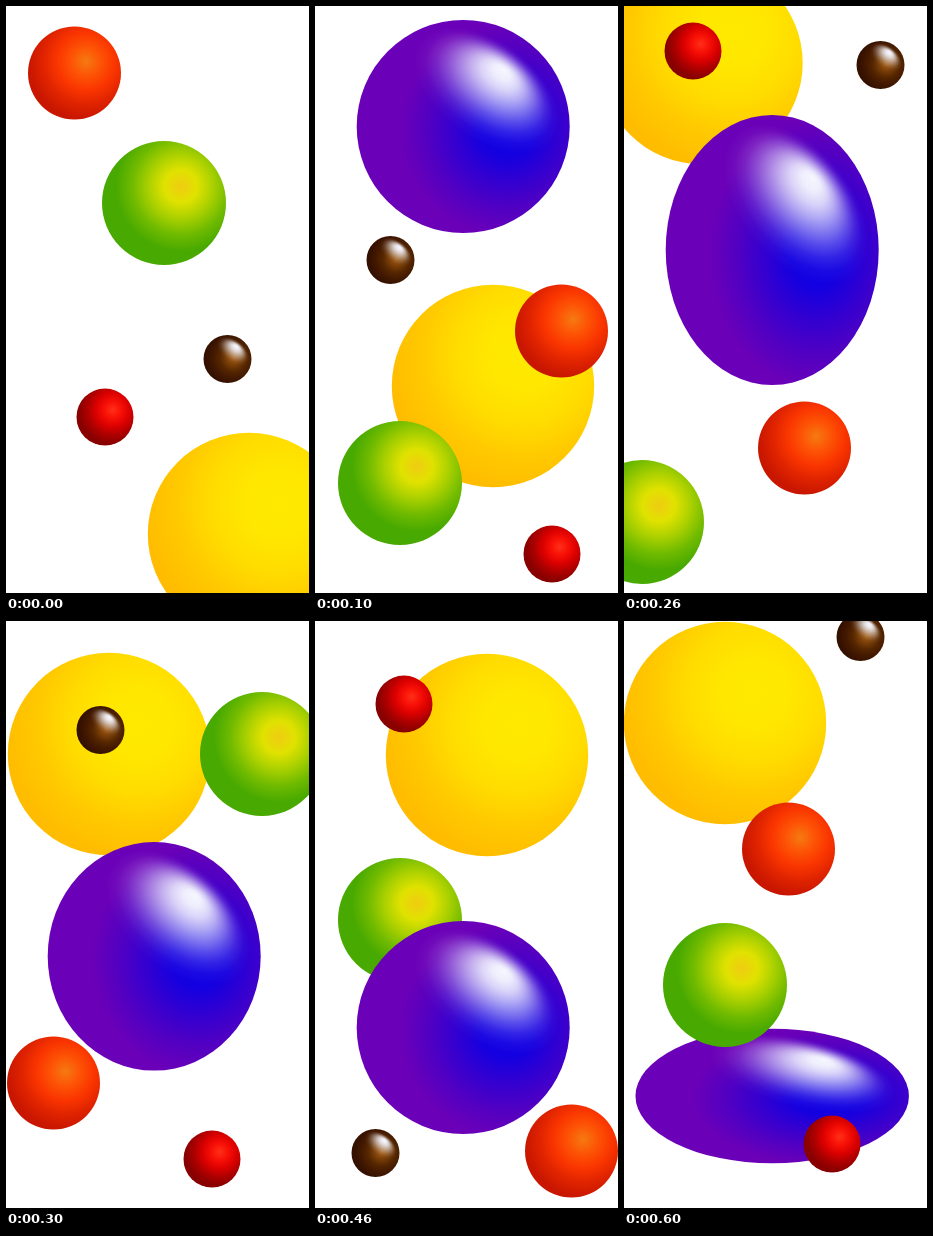
An HTML page with a canvas for the animation above (0.7 s loop, 303 by 587 pixels).

```html
<!DOCTYPE html>
<html lang="en">
<head>
<meta charset="utf-8">
<title>Bouncing balls</title>
<style>
html, body { margin: 0; width: 100%; height: 100%; overflow: hidden; background: #fff; }
canvas { display: block; }
</style>
</head>
<body>
<canvas id="stage" width="303" height="587"></canvas>
<script>
const ctx = document.getElementById('stage').getContext('2d');
const STEP = 100, COUNT = 7;

// Gradients live in unit-ball space; their colours are evenly spaced.
function fillGradient(grad, colors) {
  colors.forEach((c, i) => grad.addColorStop(i / (colors.length - 1), c));
  ctx.fillStyle = grad;
  ctx.fillRect(-4, -4, 8, 8);
}

const glow = (x, y, r, colors) => () =>
  fillGradient(ctx.createRadialGradient(x, y, 0, x, y, r), colors.split(' ').map(c => '#' + c));

// Tilted white shine, brightest towards the upper right rim.
function gloss() {
  const fade = Array.from({ length: 9 }, (_, i) => {
    const alpha = (1 + Math.cos(Math.PI * i / 8)) / 2;
    return `rgba(246,247,255,${alpha})`;
  });
  ctx.save();
  ctx.translate(0.22, -0.34);
  ctx.rotate(0.64);
  ctx.scale(0.78, 0.46);
  fillGradient(ctx.createRadialGradient(0.02, -0.55, 0, 0, 0, 1), fade);
  ctx.restore();
}

// One landing point per jump.
const yellow = {
  r: 101.2,
  shade: [glow(0.3, -0.3, 1.35, 'ffe900 ffe700 ffdc00 ffc900 ffbc00')],
  x: [243, 178, 77.5, 103, 172, 200, 101],
  y: [528, 380, 57, 133, 134, 195, 102]
};
const green = {
  r: 62,
  shade: [glow(0.27, -0.27, 1.05, 'f0cc12 e0e200 a9d000 6fba00 48a900')],
  x: [158, 85, 18, 256, 85, 255.5, 101],
  y: [197, 477, 516, 133, 299, 489, 364]
};
const orange = {
  r: 46.5,
  shade: [glow(0.25, -0.25, 1.25, 'f57a12 fd5405 fa3500 df2300 c81600')],
  x: [68.5, 246.5, 180.5, 47.5, 256.5, 77.5, 164.5],
  y: [67, 325, 442, 462, 530, 59, 228]
};
const brown = {
  r: 24,
  shade: [glow(0.25, -0.05, 1.15, 'a05810 7c4008 552600 421800 341000'), gloss],
  x: [221.5, 75.5, 256.5, 94.5, 60.5, 43.5, 236.5],
  y: [353, 254, 59, 109, 532, 234, 16]
};
const red = {
  r: 28.5,
  shade: [glow(0.27, -0.25, 1.2, 'ff3018 f81006 da0000 ab0000 880000')],
  x: [99, 237, 69, 206, 89, 226, 208],
  y: [411, 548, 45, 538, 83, 135, 523]
};
// The purple ball drops straight down and is offstage on the first step.
const purple = {
  r: 106.5,
  shade: [glow(0.42, 0.03, 1, '1000e4 1400e0 3400d0 5200c2 6a00b8'), gloss],
  x: Array(COUNT).fill(148.2),
  y: [-200, 120.5, 244, 335.3, 406.5, 426.5, 475],
  tall: [1, 1, 1.268, 1.073, 1, 0.812, 0.631]
};

function drawBall({ r, shade, x, y, tall }, step) {
  const ry = tall ? r * tall[step] : r;
  // A flattened ball bulges sideways.
  const rx = r + 0.085 * Math.max(0, r - ry) ** 1.6;
  ctx.save();
  ctx.translate(x[step], y[step]);
  ctx.scale(rx, ry);
  ctx.beginPath();
  ctx.arc(0, 0, 1, 0, Math.PI * 2);
  ctx.clip();
  shade.forEach(paint => paint());
  ctx.restore();
}

function draw(now) {
  const step = Math.floor(now / STEP) % COUNT;
  ctx.fillStyle = '#fff';
  ctx.fillRect(0, 0, 303, 587);
  // The ball whose centre is higher passes in front, except before the final bounce.
  const middle = step === COUNT - 1 ? [purple, green] : [green, purple];
  [yellow, ...middle, orange, brown, red].forEach(ball => drawBall(ball, step));
}

function tick() {
  draw(performance.now());
  requestAnimationFrame(tick);
}
tick();
</script>
</body>
</html>
```
